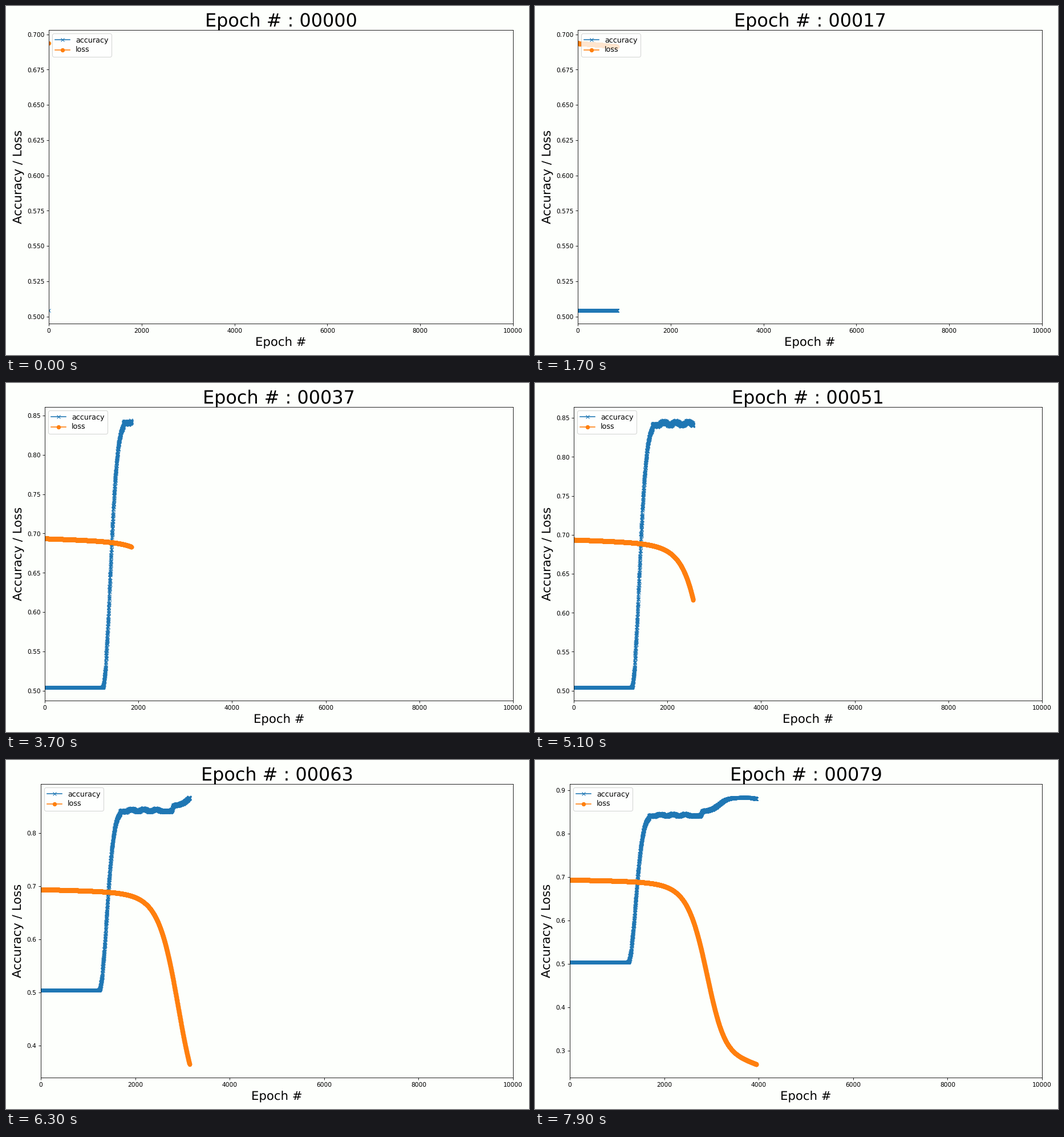
Write a matplotlib script that moves like this. It is 917 by 611 pixels and loops after 8000 ms.

```python
import matplotlib.pyplot as plt
import numpy as np
from matplotlib.animation import FuncAnimation

W, H = 917, 611
DPI = W / 12
FRAMES, STEP = 80, 50
BG = "#fdfffc"


def sigmoid(x):
    return 1 / (1 + np.exp(-x))


def loss_curve(e):
    """Slow decline, then a drop that steepens towards its end."""
    u = (e - 2851) / 1000
    depth = 0.417 + 0.038 * (e - 3950) / 1000
    return 0.6938 - 0.002 * e / 1000 - depth * sigmoid(9.1 * np.expm1(0.55 * u))


def accuracy_curve(e, rng):
    """Flat start, steep noisy rise, wavy plateau, second climb."""
    late = np.maximum(e + rng.uniform(-8, 8, e.size) - 1235, 0)
    rise = 0.3366 * (1 - np.exp(-(late / 217) ** 2))
    wave = 0.002 * (1 + np.sin(2 * np.pi * (e - 2115) / 260))
    wave[(e < 1680) | (e > 2560)] = 0
    climb = 0.0105 * sigmoid((e - 2790) / 10) + 0.0315 * sigmoid((e - 3160) / 90)
    droop = 0.075 * (np.maximum(e - 3750, 0) / 1000) ** 2
    spread = np.interp(e, [1600, 1700, 3150, 3350], [0, 0.002, 0.002, 0.0005])
    return 0.5044 + rise + wave + climb - droop + spread * rng.uniform(-1, 1, e.size)


epochs = np.arange((FRAMES - 1) * STEP + 1)
loss = loss_curve(epochs)
acc = accuracy_curve(epochs, np.random.default_rng(4))

plt.rcParams["text.hinting"] = "none"
fig, ax = plt.subplots(figsize=(12, (H + 0.001) / DPI), dpi=DPI, facecolor=BG)
fig.subplots_adjust(right=889 / W, bottom=1 - 556 / H, top=1 - 42 / H)
ax.set_facecolor(BG)
acc_line, = ax.plot([], [], "-x", color="#1f77b4", label="accuracy")
loss_line, = ax.plot([], [], "-o", color="#ff7f0e", label="loss")
ax.set_xlim(0, 10000)
ax.set_xlabel("Epoch #", fontsize=20, labelpad=5)
ax.set_ylabel("Accuracy / Loss", fontsize=20, labelpad=5)
title = ax.set_title("", fontsize=30)
ax.legend(loc="upper left", fontsize=12, labelspacing=0.41)


def update(k):
    end = k * STEP + 1
    acc_line.set_data(epochs[:end], acc[:end])
    loss_line.set_data(epochs[:end], loss[:end])
    low = min(acc[:end].min(), loss[:end].min())
    high = max(acc[:end].max(), loss[:end].max())
    pad = 0.05 * (high - low)
    ax.set_ylim(low - pad, high + pad)
    title.set_text(f"Epoch # : {k:05d}")

    # the left margin follows the length of the tick labels
    labels = ax.yaxis.get_major_formatter().format_ticks(ax.get_yticks())
    fig.subplots_adjust(left=(40 + 7 * len(labels[0])) / W)
    return acc_line, loss_line, title


anim = FuncAnimation(fig, update, frames=FRAMES, interval=100,
                     repeat=True, repeat_delay=0)
plt.show()
```
